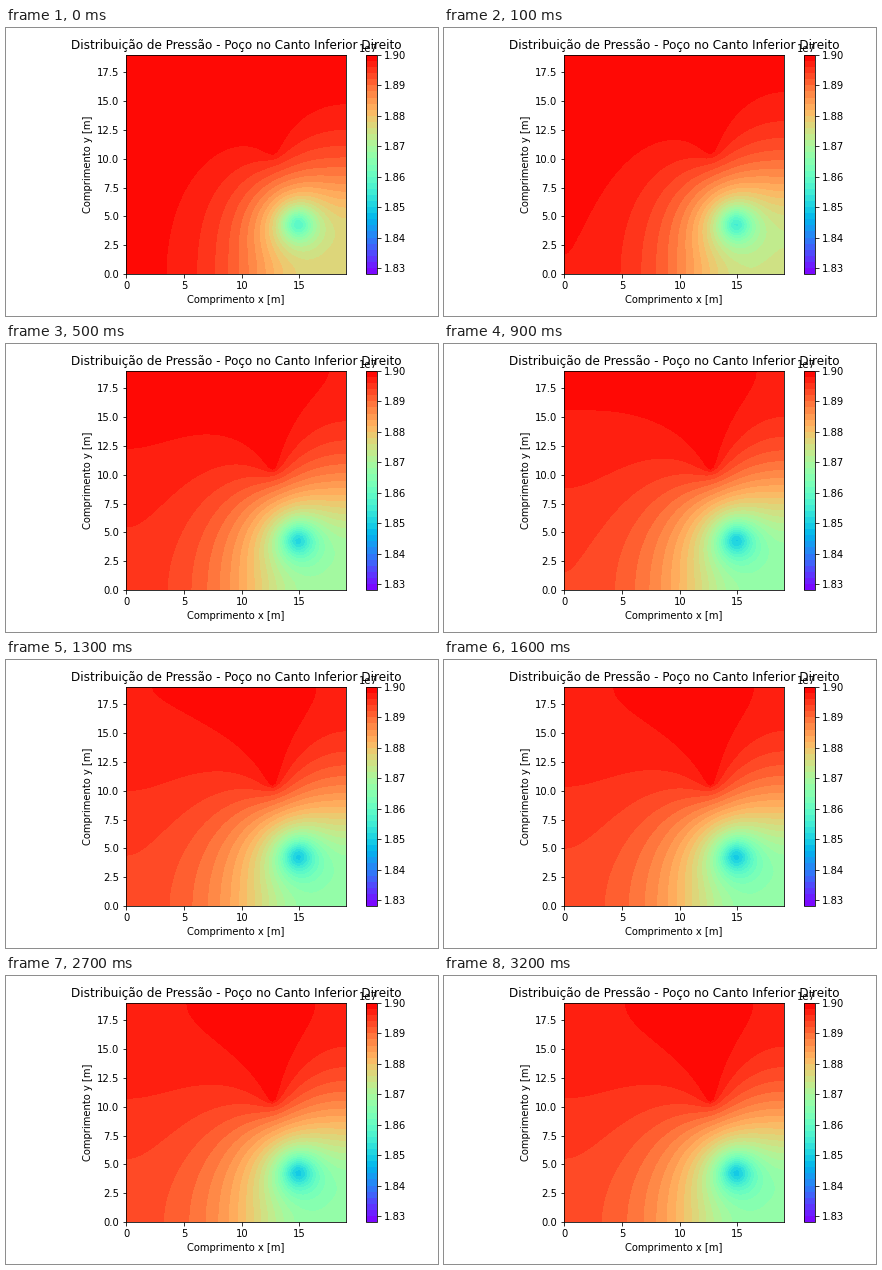
These frames come from a looping animation (432 by 288 pixels, 7540 ms). A matplotlib script:

```python
import numpy as np
import matplotlib.pyplot as plt
from matplotlib.animation import FuncAnimation

W, H, DPI = 432, 288, 72
LOOP_MS, TICK_MS, STEP_MS = 7540, 20, 100
STEPS = 33

SIZE, N = 19, 58
P0 = 1.9e7
CORNER_DROP = 3.31e5         # steady pressure loss in the lower right corner
DIFFUSION = 9                # cells squared per step
LEAK_LENGTH = 7.6            # reach of the recharge that restores P0
WARM_UP = 3.5                # steps elapsed when the loop starts
WELL, WELL_RADIUS = (14.84, 4.34), 0.62


def pressure_history():
    """Diffuse the well's drawdown in a closed box with one constant-pressure line."""
    axis = np.linspace(0, SIZE, N)
    x, y = np.meshgrid(axis, axis)
    r2 = (x - WELL[0]) ** 2 + (y - WELL[1]) ** 2
    sink = np.exp(-r2 / (2 * WELL_RADIUS ** 2))

    h = axis[1]
    lap = np.eye(N, k=1) + np.eye(N, k=-1) - 2 * np.eye(N)
    lap[0, 1] = lap[-1, -2] = 2          # no flow through the walls
    lap -= np.eye(N) * (h / LEAK_LENGTH) ** 2 / 2
    total = DIFFUSION / h ** 2
    substeps = int(np.ceil(total / 0.22))
    rate = total / substeps

    drop = np.zeros((N, N))
    history = []
    for step in range(STEPS):
        for _ in range(substeps if step else int(WARM_UP * substeps)):
            drop += rate * (lap @ drop + drop @ lap.T + sink)
            drop[32:, 38] = 0
        history.append(drop.copy())
    scale = CORNER_DROP / drop[0, -1]
    return axis, [P0 - scale * d for d in history]


def px_axes(fig, left, top, width, height):
    return fig.add_axes([left / W, 1 - (top + height) / H, width / W, height / H])


fig = plt.figure(figsize=(W / DPI, H / DPI), dpi=DPI)
ax = px_axes(fig, 120.45, 26.95, 219.15, 219.15)
cax = px_axes(fig, 360.4, 26.95, 10.96, 219.15)

levels = np.linspace(1.828e7, P0, 37)
axis, history = pressure_history()
maps = [ax.contourf(axis, axis, np.clip(p, levels[0], P0), levels, cmap="rainbow")
        for p in history]

ax.set_title("Distribuição de Pressão - Poço no Canto Inferior Direito")
ax.set_xlabel("Comprimento x [m]")
ax.set_ylabel("Comprimento y [m]")
ax.set_xticks(range(0, 16, 5))
ax.set_yticks(np.arange(0, 18, 2.5))
fig.colorbar(maps[0], cax=cax, ticks=np.arange(183, 191) * 1e5)


def update(frame):
    step = min(frame * TICK_MS // STEP_MS, STEPS - 1)
    for i, m in enumerate(maps):
        m.set_visible(i == step)
    return maps


anim = FuncAnimation(fig, update, frames=LOOP_MS // TICK_MS, interval=TICK_MS,
                     repeat=True, repeat_delay=0, blit=False)
plt.show()
```
